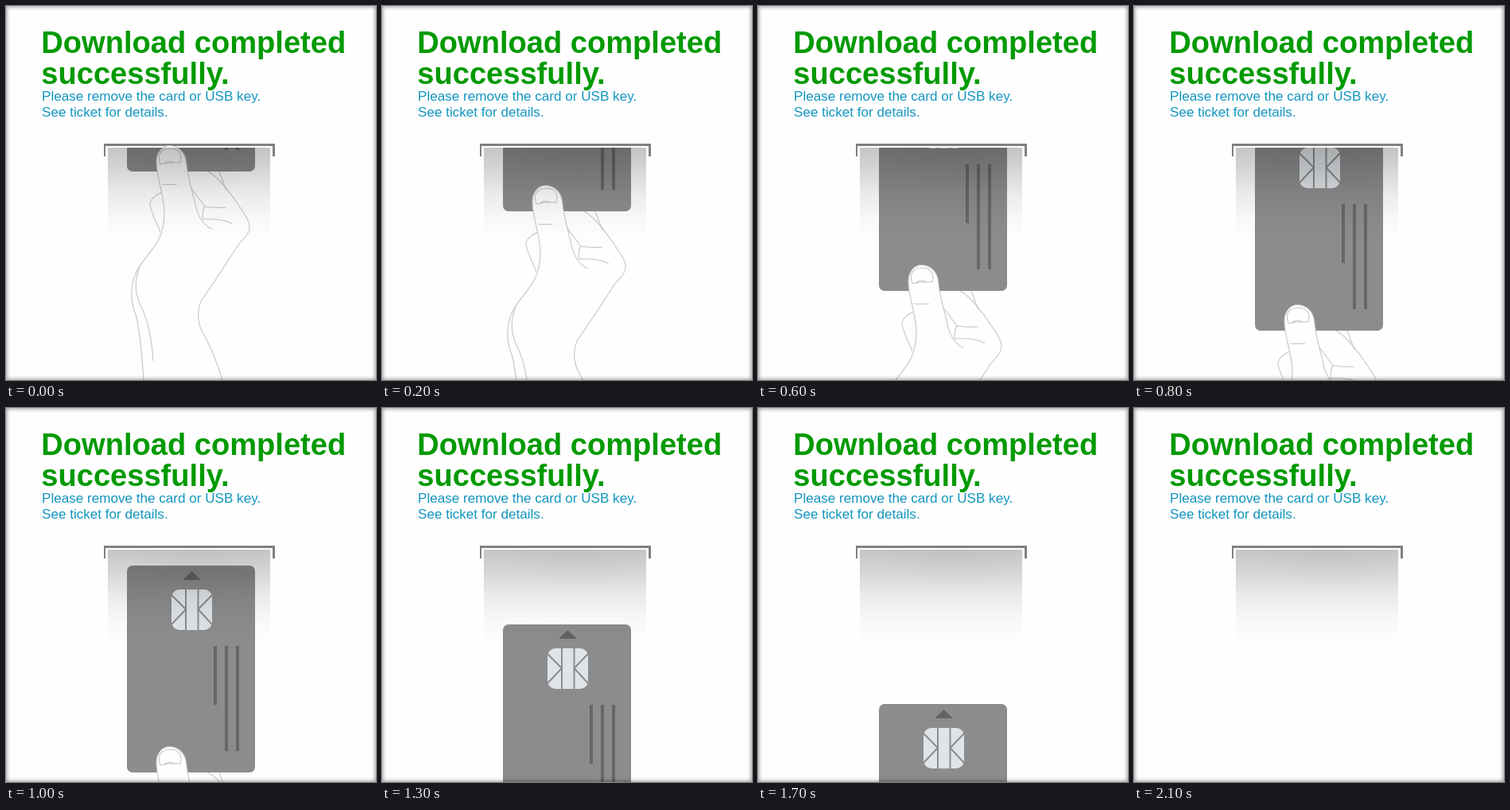
An HTML page for the animation above (2.2 s loop, 465 px wide and 470 px high).

```html
<!DOCTYPE html>
<html lang="en">
<head>
<meta charset="utf-8">
<title>Remove card</title>
<style>
html, body { margin: 0; width: 100%; height: 100%; overflow: hidden; background: #fefefe; }
svg { display: block; font-family: "Liberation Sans", Arial, sans-serif; }
.frame { position: absolute; inset: 0; box-shadow: inset 0 0 5px 1px rgba(0,0,0,.42); }
.title { font-size: 38.1px; font-weight: bold; fill: #009a00; }
.note { font-size: 17.1px; fill: #1295c0; }
.line { fill: none; stroke: #c6c6c6; stroke-width: 1.1; }
</style>
</head>
<body>
<svg width="465" height="470" viewBox="0 0 465 470">
  <defs>
    <clipPath id="slot"><rect y="178" width="465" height="292"/></clipPath>
    <linearGradient id="shade" x2="0" y2="1">
      <stop offset="0" stop-opacity=".225"/>
      <stop offset=".25" stop-opacity=".155"/>
      <stop offset=".5" stop-opacity=".075"/>
      <stop offset=".75" stop-opacity=".025"/>
      <stop offset="1" stop-opacity="0"/>
    </linearGradient>
    <radialGradient id="core" cx=".58" cy="0" r=".5">
      <stop offset="0" stop-opacity=".03"/>
      <stop offset="1" stop-opacity="0"/>
    </radialGradient>
  </defs>

  <g class="title">
    <text x="44.3" y="58.5">Download completed</text>
    <text x="44.3" y="97.5">successfully.</text>
  </g>
  <g class="note">
    <text x="45" y="119">Please remove the card or USB key.</text>
    <text x="45" y="139">See ticket for details.</text>
  </g>

  <path d="M123 173H338V189H335V176H125V189H123Z" fill="#808080"/>

  <g clip-path="url(#slot)">
    <g class="mover">
      <!-- fingers and forearm, behind the card -->
      <g class="line" transform="translate(0 52)">
        <path d="M254 208C265 214 276 227 288 244C294 253 300 261 304 269C308 278 306 284 300 291L292 300C278 322 263 345 249 365C241 374 239 393 246 408C256 425 265 447 272 470"/>
        <path d="M268 208L277 232M233 229L250 252Q263 254 277 253M250 252C247 255 247 261 247 268C264 267 277 269 285 274"/>
        <path d="M196 234C187 238 181 243 181 250C183 261 190 274 194 284"/>
        <path d="M168 328C161 345 162 361 169 376C179 395 183 417 185 446"/>
      </g>
      <rect x="152" width="161" height="260" rx="7" fill="#8c8c8e"/>
      <path d="M222 18L233.5 7L245 18Z" fill="#636365"/>
      <path d="M261 101h4v74h-4zM275 101h4v132h-4zM289 101h4v132h-4z" fill="#666668"/>
      <rect x="208" y="30" width="51" height="51" rx="10" fill="#dfe4e6"/>
      <path d="M226 30V81M241.5 30V81M208 37L226 55L208 74M259 37L241.5 55L259 74" fill="none" stroke="#8c8c8e" stroke-width="2"/>
    </g>
  </g>

  <g class="mover">
    <g class="line" transform="translate(0 52)">
      <path d="M199 258C198 235 189 215 189 196C189 184 196 175.500 206 175.500C217 176 225 184 226.500 195C228 214 234 232 238 250Z" fill="#fefefe" stroke="none"/>
      <path d="M173 470C171 442 169 408 163 388C156 370 156 350 164 334C171 319 186 307 193 291C198 280 199 270 199 258C198 235 189 215 189 196C189 184 196 175.500 206 175.500C217 176 225 184 226.500 195C228 214 234 232 238 250C241 264 247 274 258 280"/>
      <path d="M194 199C190 187 193 180 206 179C218 179 222 187 219 197Q206 196 194 199M198 198Q204 193 212 197M196 224Q206 225 215 224"/>
    </g>
  </g>

  <rect x="128" y="178" width="204" height="118" fill="url(#shade)"/>
  <rect x="128" y="178" width="204" height="118" fill="url(#core)"/>
</svg>
<div class="frame"></div>
<script>
const movers = document.querySelectorAll('.mover');

function draw() {
  const step = Math.floor(performance.now() / 100) % 22;
  const y = -52 + 25 * step - (step > 11 ? 1 : 0);
  movers.forEach(m => m.setAttribute('transform', `translate(0 ${y})`));
  requestAnimationFrame(draw);
}
draw();
</script>
</body>
</html>
```
